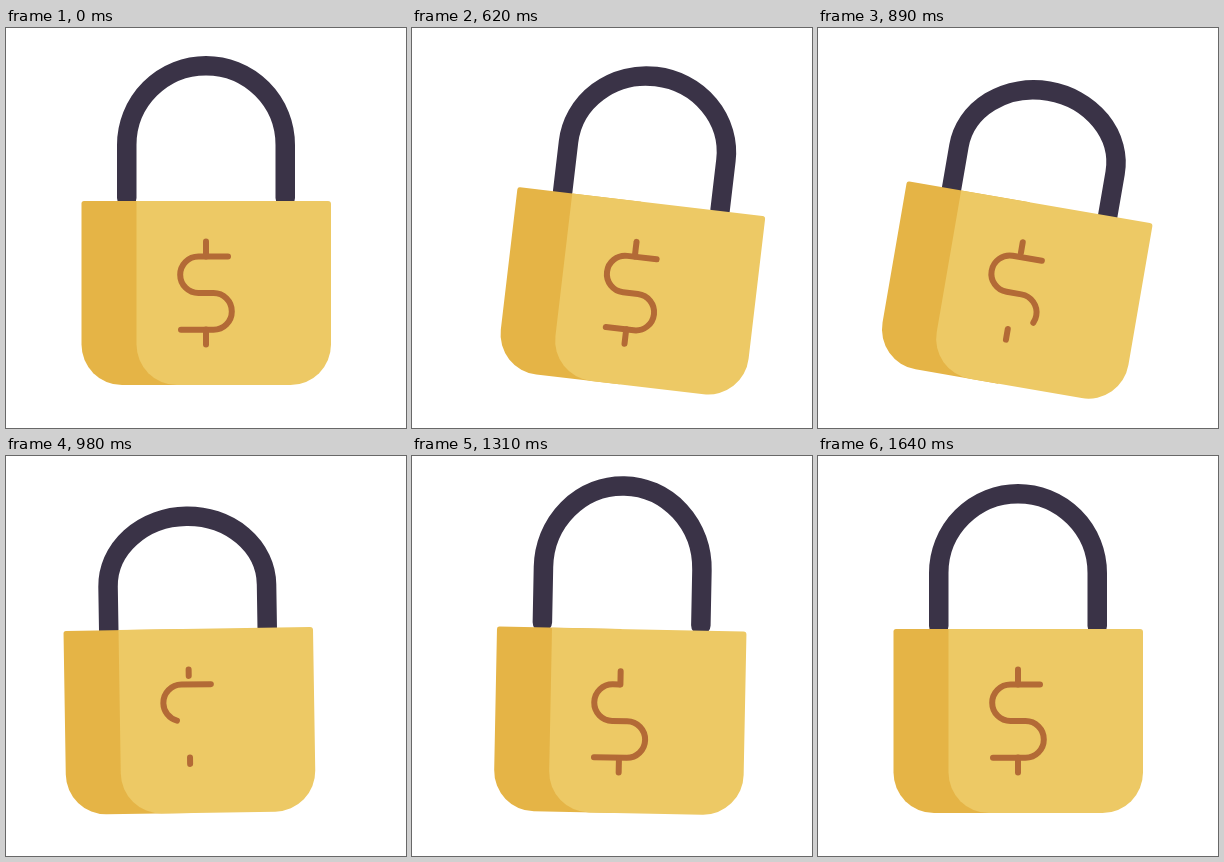
Write an HTML page that moves like this. It is 400x400 px and loops after 1.67 s.

```html
<!DOCTYPE html>
<html lang="en">
<head>
<meta charset="utf-8">
<title>Padlock</title>
<style>
  html, body { margin: 0; width: 100%; height: 100%; overflow: hidden; background: #fff; }
  svg { display: block; width: 100vw; height: 100vh; }
  .line { fill: none; stroke: #b36a36; stroke-width: 6; stroke-linecap: round; }
</style>
</head>
<body>
<svg viewBox="0 0 400 400">
  <g id="lock">
    <path id="shackle" fill="none" stroke="#3a3347" stroke-width="19.5" stroke-linecap="round"/>
    <path fill="#e5b446" d="M78 173H200V357H116A40.5 40.5 0 0 1 75.5 316.5V175.5Q75.5 173 78 173Z"/>
    <path fill="#edc965" d="M130.5 173H322Q325 173 325 176V316.5A40.5 40.5 0 0 1 284.5 357H171A40.5 40.5 0 0 1 130.5 316.5Z"/>
    <path class="line" pathLength="1" d="M200 213.5V228.5"/>
    <path class="line" pathLength="1" d="M222 228.5H192.5A18.3 18.3 0 0 0 192.5 265.1H207.500A18.3 18.3 0 0 1 207.5 301.7H175"/>
    <path class="line" pathLength="1" d="M200 301.5V316.5"/>
  </g>
</svg>
<script>
  const LOOP = 1670, START = 530, STEP = 30, END = 1640;
  const lock = document.getElementById('lock');
  const shackle = document.getElementById('shackle');
  const lines = document.querySelectorAll('.line');

  const mix = (a, b, u) => a + (b - a) * u;
  const ease = u => (1 - Math.cos(Math.PI * u)) / 2;

  // Swings from rest through each [time, peak], easing in and out.
  const swing = (begin, ...peaks) => t => {
    let from = begin, value = 0;
    for (const [to, peak] of peaks) {
      if (t < to) return mix(value, peak, ease(Math.max(0, (t - from) / (to - from))));
      [from, value] = [to, peak];
    }
    return value;
  };

  const shift = swing(475, [695, 25], [1010, -17.5], [1255, 8.5], [1530, 0]);
  const tilt = swing(492, [777, 16], [1155, -14.3], [1375, 5], [1530, 0]);
  const press = swing(500, [770, 22.4], [1000, 22.4], [1250, -12], [1430, 4.5], [END, 0]);

  // The sign is erased from its end, then drawn back from the same side.
  const TURN = 1050, FADE = 128;
  const hidden = t => Math.max(0, 1.012 * Math.exp(-Math.abs(t - TURN) / FADE) - 0.012);

  // Squashes the arch towards a point behind the body; the stroke keeps its width.
  function drawShackle(d) {
    const scale = 1 - d / 179;
    const y = v => mix(217, v, scale);
    const arc = `A79.25 ${79.25 * scale} 0 0 1 279.25 ${y(117)}`;
    shackle.setAttribute('d', `M120.75 ${y(170)}V${y(117)}${arc}V${y(170)}`);
  }

  function drawSign(t) {
    const shown = t < START || t >= END ? 1 : 1 - hidden(t);
    for (const line of lines) {
      line.style.strokeDasharray = shown < 1 ? `${shown} 2` : 'none';
      line.style.strokeDashoffset = t < TURN ? 0 : shown - 1;
    }
  }

  function draw() {
    const now = performance.now() % LOOP;
    const t = now < START ? 0 : START + Math.floor((now - START) / STEP) * STEP;
    lock.setAttribute('transform', `translate(${shift(t)} 0) rotate(${tilt(t)} 200 265)`);
    drawShackle(press(t));
    drawSign(t);
    requestAnimationFrame(draw);
  }
  draw();
</script>
</body>
</html>
```
